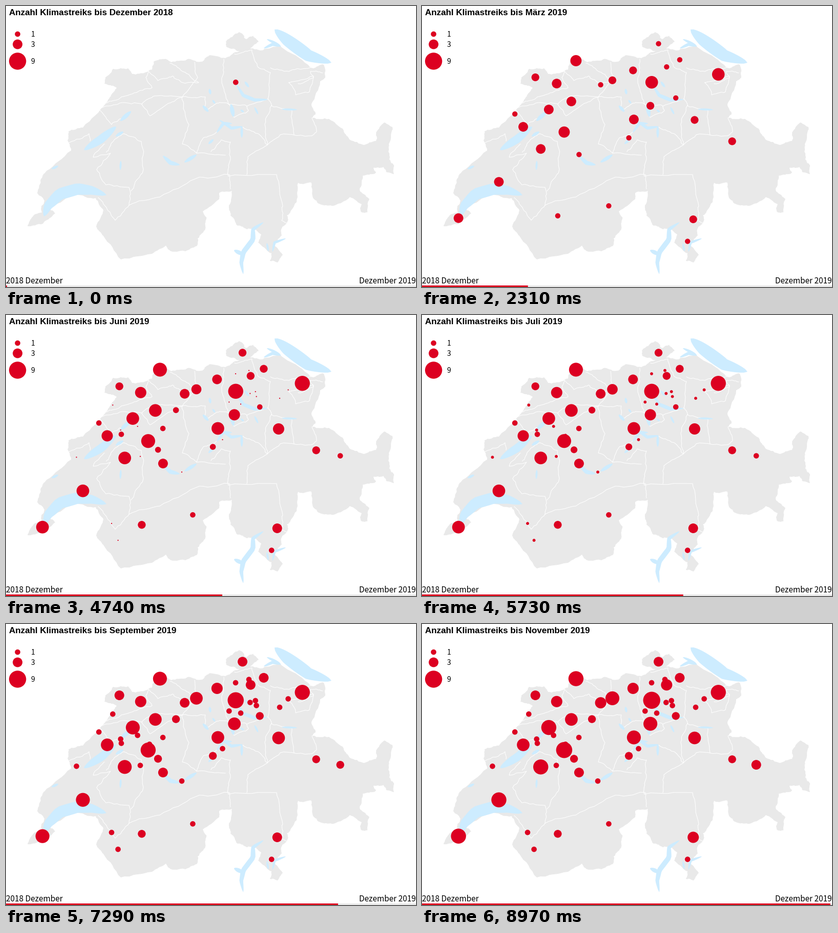
Animation, 800 px wide and 550 px high, one loop 9000 ms. Source, as a matplotlib script:

```python
import random

import matplotlib.pyplot as plt
import numpy as np
from matplotlib.animation import FuncAnimation
from matplotlib.patches import Circle, Polygon, Rectangle

W, H, FRAMES, STEP = 800, 550, 300, 30
RED, LAND, WATER = "#dc0021", "#e9e9e9", "#cdecff"
rng = random.Random(4)

fig = plt.figure(figsize=(W / 100, H / 100), dpi=100, facecolor="white")
ax = fig.add_axes([0, 0, 1, 1])
ax.set_xlim(0, W)
ax.set_ylim(H, 0)
ax.axis("off")


def rough(points, amp, depth=3):
    """Split every segment by displaced midpoints, like a natural coast."""
    for _ in range(depth):
        out = [points[0]]
        for (x0, y0), (x1, y1) in zip(points, points[1:]):
            k = min(amp, 0.15 * np.hypot(x1 - x0, y1 - y0))
            out += [((x0 + x1) / 2 + rng.uniform(-k, k),
                     (y0 + y1) / 2 + rng.uniform(-k, k)), (x1, y1)]
        points = out
    return points


def border(*points):
    ax.plot(*zip(*rough(list(points), 1.8)), color="white", lw=0.75, zorder=2)


def lake(width, *points):
    """A ribbon along the points that tapers at both ends."""
    t = np.linspace(0, 1, 25)
    xs, ys = np.array(points, float).T
    knots = np.linspace(0, 1, len(points))
    x, y = np.interp(t, knots, xs), np.interp(t, knots, ys)
    dx, dy = np.gradient(x), np.gradient(y)
    half = width / 2 * np.sin(np.pi * t).clip(0) ** 0.6 / np.hypot(dx, dy)
    left = np.column_stack([x - dy * half, y + dx * half])
    right = np.column_stack([x + dy * half, y - dx * half])
    ax.add_patch(Polygon(np.vstack([left, right[::-1]]), fc=WATER, ec="none",
                         zorder=3))


def label(x, y, text, px, family="Noto Sans CJK JP", **kw):
    return ax.text(x, y, text, fontsize=px * 0.72, color="black",
                   family=[family, "Liberation Sans"], va="baseline",
                   zorder=6, **kw)


# Key points of the outline, clockwise from the south-west tip
north = [
    (42, 431), (53, 411), (70, 404), (69, 392), (75, 381), (61, 366),
    (68, 339), (80, 322), (127, 283), (120, 263), (122, 245), (150, 238),
    (196, 189), (205, 174), (216, 160), (192, 152), (194, 140), (209, 123),
    (238, 122), (246, 133), (272, 130), (285, 124), (288, 109), (308, 104),
    (322, 110), (354, 104), (380, 109), (396, 97), (428, 102), (456, 88),
    (430, 80), (429, 70), (455, 51), (469, 65), (482, 58), (493, 70),
    (476, 83), (497, 87), (534, 78), (574, 103), (600, 122), (620, 115),
    (623, 140), (613, 147), (596, 192), (604, 212)]
south = [
    (597, 219), (630, 221), (659, 244), (670, 261), (698, 272), (722, 264),
    (722, 248), (738, 228), (754, 237), (747, 270), (748, 300), (757, 312),
    (757, 329), (742, 325), (736, 315), (717, 317), (722, 326), (696, 332),
    (690, 360), (709, 378), (705, 404), (692, 402), (694, 388), (671, 374),
    (662, 381), (636, 391), (611, 387), (601, 378), (596, 346), (570, 346),
    (567, 384), (548, 410), (550, 420), (537, 437), (538, 449), (521, 465),
    (540, 487), (530, 502), (515, 499), (518, 484), (492, 463), (498, 448),
    (488, 438), (470, 437), (452, 430), (438, 410), (435, 395), (441, 362),
    (416, 366), (416, 378), (384, 402), (391, 417), (389, 436), (374, 455),
    (372, 470), (350, 480), (322, 480), (312, 469), (285, 485), (224, 496),
    (190, 450), (176, 432), (190, 400), (175, 376), (130, 370), (84, 397),
    (96, 406), (72, 426), (42, 431)]
ax.add_patch(Polygon(rough(north + south, 1.5), fc=LAND, ec="none", zorder=1))

# Cantons
border((196, 190), (225, 178), (250, 170), (285, 160), (273, 140), (278, 128))
border((278, 128), (296, 146), (325, 137), (345, 150), (376, 150), (350, 130),
       (320, 112))
border((182, 202), (222, 190), (265, 192), (290, 176), (344, 178))
border((265, 192), (281, 215), (318, 190), (344, 178), (374, 140), (368, 110))
border((344, 178), (346, 200), (357, 232), (344, 270), (372, 288), (428, 292))
border((344, 178), (389, 178), (391, 203), (412, 190), (434, 192))
border((425, 104), (421, 146), (434, 192), (470, 196), (511, 182))
border((434, 192), (445, 218), (473, 205), (470, 196))
border((446, 94), (480, 86), (492, 120), (516, 130), (511, 182), (518, 195))
border((516, 121), (552, 128), (600, 121))
border((552, 150), (600, 137), (592, 168), (565, 174), (552, 150))
border((570, 152), (600, 140), (594, 128), (618, 131))
border((518, 195), (505, 232), (510, 272), (535, 252), (597, 254), (606, 246),
       (597, 219))
border((518, 195), (558, 204), (562, 252))
border((462, 237), (495, 252), (510, 272), (472, 295), (470, 330))
border((434, 333), (528, 330), (540, 392), (538, 420), (548, 425))
border((213, 419), (240, 390), (300, 374), (370, 338), (436, 330), (438, 358))
border((180, 375), (196, 394), (213, 419))
border((240, 390), (240, 355), (195, 350), (177, 320), (204, 288), (170, 296),
       (192, 270))
border((244, 362), (268, 320), (264, 265), (230, 250), (206, 268), (196, 286))
border((122, 268), (162, 250), (164, 264))
border((182, 202), (206, 232), (228, 220))
border((372, 288), (385, 258), (412, 246))
border((400, 285), (420, 262), (438, 266), (438, 300), (434, 333))

# Lakes
lake(23, (74, 412), (82, 391), (105, 368), (140, 358), (168, 361), (196, 370))
lake(25, (524, 46), (549, 67), (590, 97), (635, 111))
lake(6, (503, 83), (520, 75), (537, 79))
lake(5, (509, 65), (535, 77))
lake(16, (152, 282), (185, 261), (215, 236))
lake(8, (223, 225), (244, 206))
lake(6, (214, 255), (229, 246))
lake(5, (89, 319), (102, 313))
lake(4, (224, 303), (223, 321))
lake(8, (306, 293), (321, 307), (339, 311))
lake(7, (348, 306), (372, 291))
lake(7, (449, 153), (463, 175), (485, 184), (511, 183))
lake(5, (466, 148), (474, 159))
lake(4, (538, 202), (568, 203))
lake(8, (439, 192), (444, 217))
lake(4, (458, 203), (464, 208))
lake(4, (485, 198), (492, 212))
lake(6, (411, 248), (424, 230), (441, 230))
lake(6, (416, 223), (440, 239), (462, 236))
lake(5, (460, 235), (460, 258))
lake(6, (384, 195), (395, 207))
lake(5, (397, 162), (399, 173))
lake(4, (403, 184), (408, 191))
lake(5, (395, 270), (405, 261))
lake(10, (503, 423), (482, 437), (482, 457), (463, 482), (459, 503), (463, 525))
lake(8, (445, 478), (464, 487))
lake(5, (546, 455), (524, 463), (520, 481))
lake(4, (509, 464), (512, 480))

# Days with strikes, in frames
DAYS = [0, 6, 30, 43, 78, 97, 122, 138, 234, 243, 299]
REGULAR = (0, 1, 2, 3, 4, 5, 7, 9, 10)
dots = []


def radius(total):
    return max(0, 5.7 * total ** 0.5 - 0.4)


def since(first, *missed):
    return [d for d in REGULAR if d >= first and d not in missed]


def towns(strikes, *places):
    """Towns that took part on the given strike days (indices of DAYS)."""
    radii = [radius(sum(s <= d for s in strikes)) for d in range(len(DAYS))]
    for xy in places:
        dot = Circle(xy, 0, fc=RED, ec="none", zorder=5)
        dots.append((ax.add_patch(dot), radii))


towns(since(0), (448.2, 149.3))
towns(since(1), (277.4, 246.7))
towns(since(1, 9), (300.4, 107))
towns(since(1, 9, 10) + [4], (578.2, 133.8))
towns(since(2), (247.4, 202.6), (231.7, 279.8), (150, 344.2), (71.2, 415.2))
towns(since(2, 9), (413.4, 222))
towns(since(2, 9, 10), (291.4, 186.8))
towns(since(2, 3), (445.6, 195.3))
towns(since(2, 3, 10), (531.9, 223))
towns(since(2, 5, 10), (197.5, 236.5))
towns([2, 3, 4, 7], (262.8, 151.8))
towns([2, 4, 5, 8, 9, 10], (371.5, 145.4))
towns([2, 4, 7, 9], (411.8, 126))
towns([2, 4, 7, 10], (529.2, 417.5))
towns([2, 4, 9], (221.2, 139.6))
towns([2, 4], (605.2, 264.8))
towns([4, 5, 7, 10], (348.6, 154.2))
towns([4, 5, 7], (306.4, 290.7))
towns([4, 5, 9], (502.9, 105.3))
towns([4, 6, 9, 10], (477.3, 119.2))
towns([4, 7, 9], (461.5, 73.8))
towns([4, 7], (264.9, 410.7))
towns([4, 8], (403.6, 258.1))
towns([4, 9], (495.2, 180))
towns([4], (181.2, 211.4), (364.4, 391.2), (518.2, 460.6))
towns([6], (225, 233.5))
towns([7, 8], (331.6, 186.2), (296.6, 263.8))
towns([7, 9, 10], (652.2, 275.6))
towns([7], (306.1, 222.1))
towns([8], (448, 115), (474, 108.6), (476.3, 153.6), (486.7, 150),
      (488.6, 159.6), (435.3, 170.4), (458, 174.4), (550.6, 146.5),
      (534, 163), (208.3, 176.3), (256.7, 218), (223.7, 225.2),
      (137.5, 278.4), (262, 276.8), (343, 307.4), (422.5, 244),
      (206, 408), (218.6, 441), (280, 235.4))

# Legend, time axis and title
for n, y in ((1, 55), (3, 75), (9, 108)):
    ax.add_patch(Circle((22.6, y), radius(n), fc=RED, ec="none", zorder=5))
    label(48.5, y + 5, str(n), 14)
label(0, 543, "2018 Dezember", 15.4)
label(W, 543, "Dezember 2019", 15.4, ha="right")
ax.add_patch(Rectangle((0, 547), W, 3, fc=LAND, ec="none", zorder=4))
bar = ax.add_patch(Rectangle((0, 547), 0, 3, fc=RED, ec="none", zorder=5,
                             snap=False))
title = label(6, 18, "", 17, family="Liberation Sans", weight="bold")

MONTHS = ("Dezember Januar Februar März April Mai Juni Juli August "
          "September Oktober November").split()
STARTS = np.cumsum([0, 31, 31, 28, 31, 30, 31, 30, 31, 31, 30, 31])


def draw(i):
    day = 13 + i * 350 / 299
    m = int(np.searchsorted(STARTS, day, side="right")) - 1
    title.set_text(f"Anzahl Klimastreiks bis {MONTHS[m]} {2019 if m else 2018}")
    bar.set_width(2 + 2.658 * i)
    for dot, radii in dots:
        r = np.interp(i, DAYS, radii)
        dot.set_radius(r)
        dot.set_visible(r > 0)
    return [title, bar] + [dot for dot, _ in dots]


anim = FuncAnimation(fig, draw, frames=FRAMES, interval=STEP, repeat=True,
                     repeat_delay=0, blit=False)
plt.show()
```
